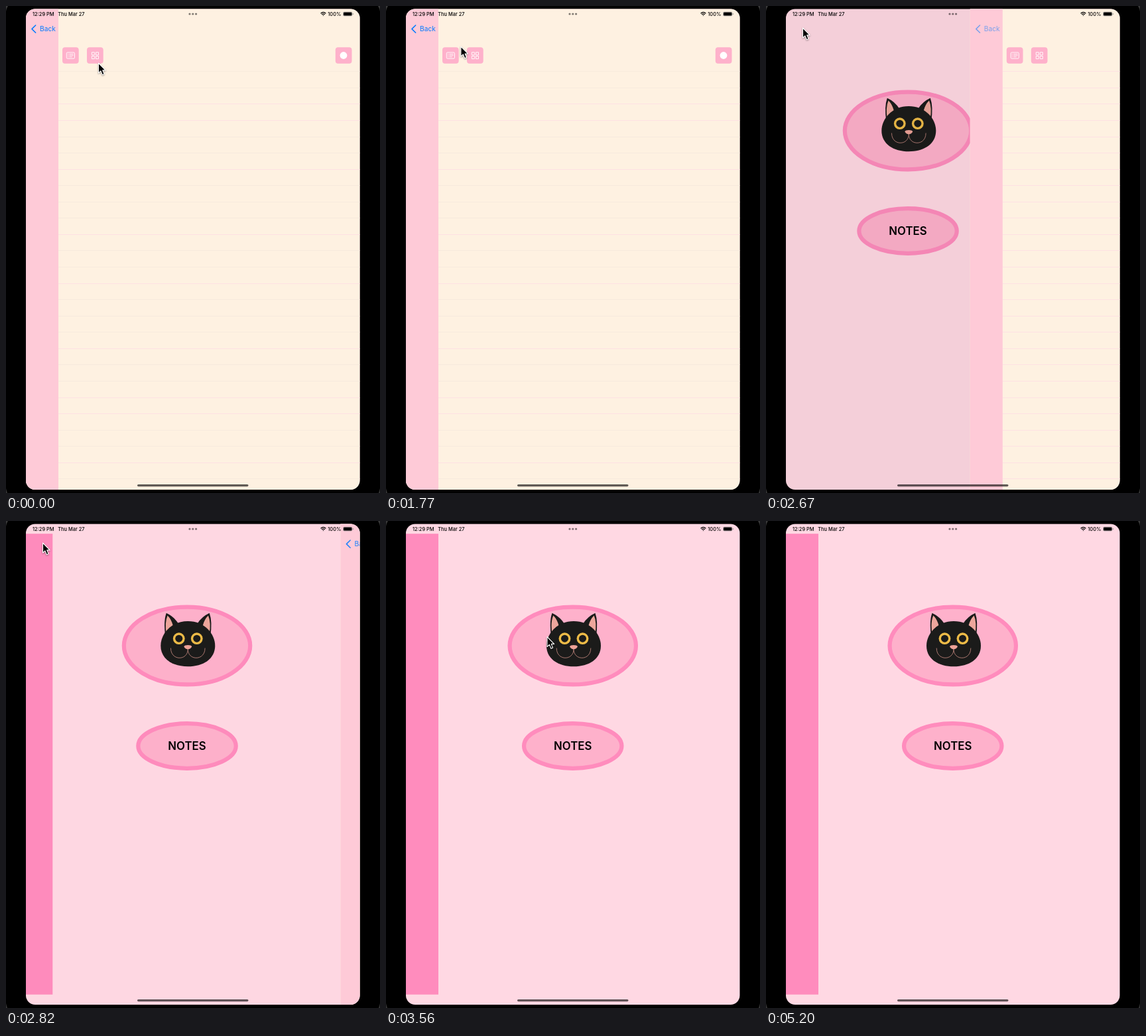
Recreate the animation shown at these times as an HTML page. Size 564x734 px, loop 7300 ms.

```html
<!DOCTYPE html>
<html lang="en">
<head>
<meta charset="utf-8">
<title>Notebook app</title>
<style>
html, body { margin: 0; width: 100%; height: 100%; overflow: hidden; background: #000; }
svg { display: block; width: 564px; height: 734px; font-family: Inter, "Open Sans", sans-serif; }
.status { font-size: 7.4px; font-weight: 500; }
</style>
</head>
<body>
<svg viewBox="0 0 564 734">
  <defs>
    <clipPath id="screen"><rect x="30" y="4.5" width="503.5" height="724.5" rx="14"/></clipPath>
    <g id="ear">
      <path d="M250.5 138.8Q246 151 249 174L269 155Q262 144 250.5 138.8Z" fill="#1b1b1a"/>
      <path d="M252.3 142.5Q247.8 153 250.6 170.5Q254 162.500 260.500 157.500Q258 148 252.300 142.500Z" fill="#eda69c"/>
    </g>
    <g id="eye">
      <circle cx="269.5" cy="177.2" r="8.9" fill="#edbb47"/>
      <circle cx="269.5" cy="177.2" r="5.5" fill="#1b1b1a"/>
    </g>
  </defs>
  <path d="M0 0H3Q1 3 0 8ZM564 0H561Q563 3 564 8ZM0 734H2Q1 731 0 727ZM564 734H562Q563 731 564 727Z" fill="#383838"/>

  <g clip-path="url(#screen)">
    <rect x="30" y="4" width="504" height="726" fill="#ffd8e3"/>
    <g id="home">
      <rect x="30" y="19.2" width="49" height="694.5" fill="#ff8cbd"/>
      <g fill="#feb1cb" stroke="#ff8cbd" stroke-width="6.2">
        <ellipse cx="281.75" cy="188" rx="95.2" ry="58.4"/>
        <ellipse cx="281.75" cy="339" rx="73.7" ry="33.8"/>
      </g>
      <text x="281.7" y="345" font-size="16.8" font-weight="600" text-anchor="middle">NOTES</text>
      <use href="#ear"/>
      <use href="#ear" transform="matrix(-1 0 0 1 566 0)"/>
      <path d="M283 151C308 151 324 170 324 188C324 208 306 219.300 283 219.300S242 208 242 188C242 170 258 151 283 151Z" fill="#1b1b1a"/>
      <use href="#eye"/>
      <use href="#eye" x="27"/>
      <path d="M277 189.300Q278 187 283 187T289 189.300Q287 193.200 283 193.200T277 189.300Z" fill="#eda298"/>
      <path d="M257.200 191.500C257 211 283 211 283 193C283 211 309 211 308.800 191.500" fill="none" stroke="#cf8f85" stroke-width=".8"/>
    </g>
    <rect id="dim" x="30" y="4" width="504" height="726"/>

    <g id="page">
      <rect x="30" y="4" width="504" height="726" fill="#fef1e1"/>
      <g id="lines"></g>
      <rect x="30" y="4" width="49" height="726" fill="#fecad7"/>
      <g id="back" fill="#007aff">
        <path d="M44.700 29L39 34.600L44.700 40.200" fill="none" stroke="#007aff" stroke-width="1.5" stroke-linecap="round" stroke-linejoin="round"/>
        <text x="51" y="38.300" font-size="10.2">Back</text>
      </g>
      <g fill="#feb1cb">
        <rect x="85" y="62.200" width="24.700" height="24.600" rx="4"/>
        <rect x="122" y="62.200" width="24.700" height="24.600" rx="4"/>
        <rect x="496.800" y="62.200" width="24.700" height="24.600" rx="4"/>
      </g>
      <g fill="none" stroke="#fff" stroke-width=".9">
        <rect x="91.300" y="70" width="12.200" height="9.200" rx="1.500"/>
        <path d="M93 72.500H94.200M95.300 72.500H101.800M93 74.600H94.200M95.300 74.600H101.800M93 76.700H94.200M95.300 76.700H99.800" stroke-width=".8"/>
        <path d="M129.400 69.800h4v4h-4zM135.500 69.800h4v4h-4zM129.400 75.600h4v4h-4zM135.500 75.600h4v4h-4z" stroke-linejoin="round"/>
      </g>
      <circle cx="509" cy="74.500" r="5.400" fill="#fff"/>
    </g>

    <g class="status">
      <text x="40" y="14.500">12:29 PM</text>
      <text x="78.300" y="14.500">Thu Mar 27</text>
      <text x="485.300" y="14.500">100%</text>
    </g>
    <g fill="#000" fill-opacity=".5">
      <circle cx="277" cy="12" r="1.600"/><circle cx="281.800" cy="12" r="1.600"/><circle cx="286.600" cy="12" r="1.600"/>
    </g>
    <g fill="none" stroke="#000" stroke-width="1.200">
      <path d="M474.600 11.200Q478.500 7.600 482.400 11.200M476.100 12.900Q478.500 10.700 480.900 12.900"/>
      <path d="M478.500 15L477.400 13.900Q478.500 13 479.600 13.900Z" fill="#000" stroke="none"/>
      <rect x="508.300" y="9" width="13.900" height="6" rx="1.800" stroke="#999" stroke-width=".6"/>
    </g>
    <rect x="509" y="9.600" width="12.500" height="4.800" rx="1.200"/>
    <rect x="522.900" y="11" width=".8" height="2" fill="#888"/>
    <rect x="198" y="721" width="167.500" height="3.200" rx="1.600" fill-opacity=".62"/>
  </g>

  <path id="cursor" d="M0 0V15L3.400 11.900L5.900 17.800L8.600 16.600L6.200 10.900H10.600Z" stroke="#fff" stroke-width="1.100" stroke-linejoin="round" style="filter:drop-shadow(0 1px 1px #0006)"/>
</svg>
<script>
const LOOP = 7300, STEP = 148.6, WIDTH = 503.5;
const $ = id => document.getElementById(id);

// Cursor stops: step, x, y
const stops = [
  [2, 139.5, 86], [4, 101, 76], [6, 139.5, 74], [8, 139.5, 74],
  [16, 55.5, 33], [19, 55.5, 33], [24, 243, 174.5], [28, 243, 174.5],
  [30, 444.5, 452], [31, 444.5, 452], [34, 547, 702]
];
const pinkLines = [2, 3, 6, 10, 13, 17, 20, 21, 24];

for (let i = 0; i < 26; i++) {
  const line = document.createElementNS("http://www.w3.org/2000/svg", "rect");
  const attrs = { x: 79, y: Math.round(98.3 + i * 24.56), width: 455, height: 1 };
  for (const name in attrs) line.setAttribute(name, attrs[name]);
  $("lines").append(line);
}

function cursorAt(step) {
  const i = stops.findIndex(s => s[0] >= step);
  if (i < 0) return null;
  const b = stops[i], a = stops[i - 1] || b;
  const p = a === b ? 0 : (step - a[0]) / (b[0] - a[0]);
  const e = p * p * (3 - 2 * p);
  return [a[1] + (b[1] - a[1]) * e, a[2] + (b[2] - a[2]) * e];
}

function shift(id, x, y = 0) {
  $(id).setAttribute("transform", `translate(${x} ${y})`);
}

function draw(now) {
  const step = Math.floor((now % LOOP + 8) / STEP);

  // Critically damped slide; the home screen follows at 30 % under a fading dim
  const s = Math.max(0, step - 17.32) * 2.72;
  const left = (1 + s) * Math.exp(-s);
  shift("page", WIDTH * (1 - left));
  shift("home", -0.3 * WIDTH * left);
  $("page").style.display = step > 20 ? "none" : "";
  $("dim").setAttribute("fill-opacity", step > 20 ? 0 : 0.1 * left);
  $("back").setAttribute("opacity", step < 17 ? 1 : Math.min(1, 0.15 + 0.37 * (step - 17)));
  [...$("lines").children].forEach((line, i) =>
    line.setAttribute("fill", s || pinkLines.includes(i) ? "#fee1e3" : "#f7eadd"));

  const pos = cursorAt(step);
  $("cursor").style.display = pos ? "" : "none";
  if (pos) shift("cursor", ...pos);
}

const start = performance.now();
function tick() {
  draw(performance.now() - start);
  requestAnimationFrame(tick);
}
tick();
</script>
</body>
</html>
```
